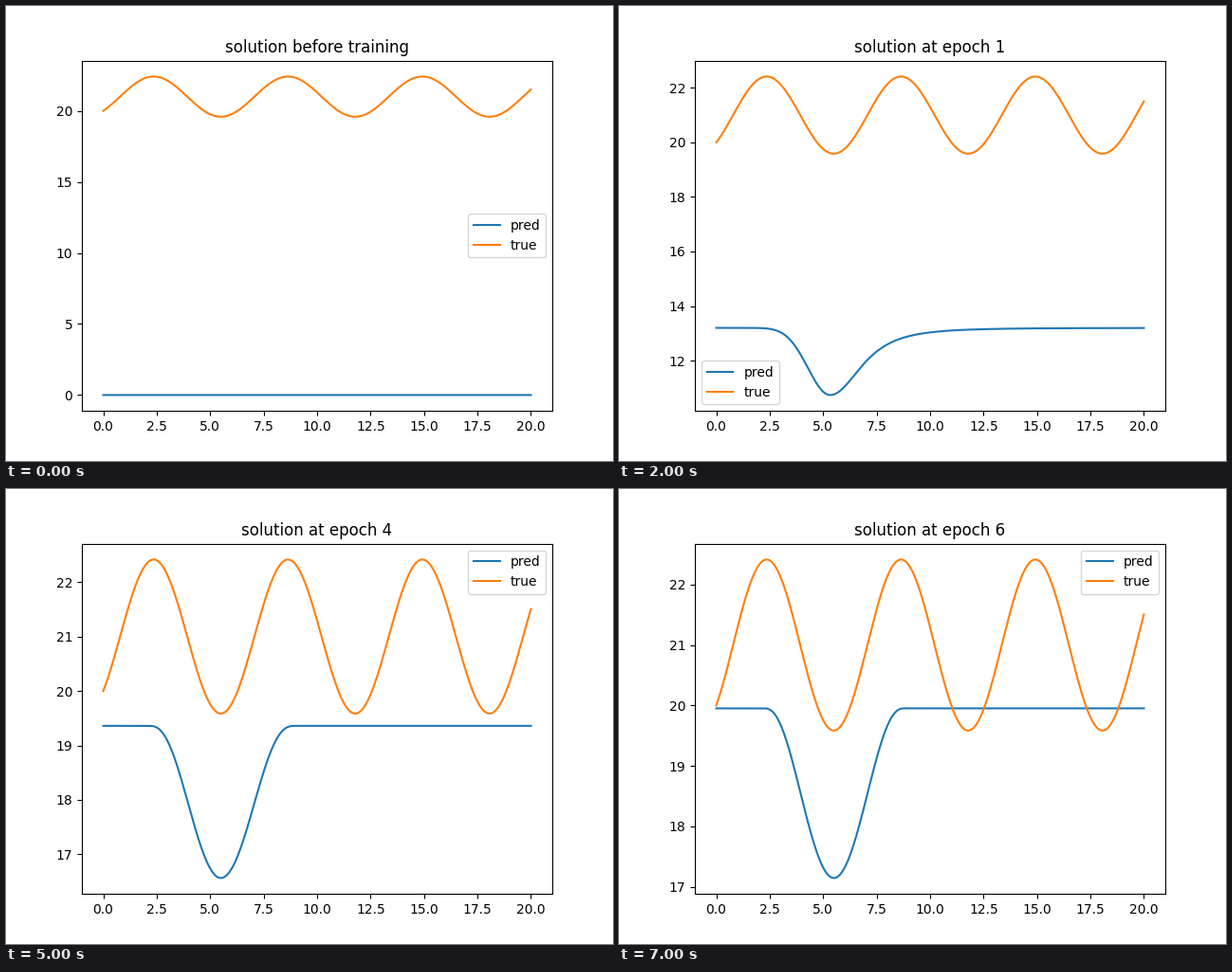
These frames come from a looping animation (640 px wide and 480 px high, 8 s). A matplotlib script:

```python
import numpy as np
import matplotlib.pyplot as plt
from matplotlib.animation import FuncAnimation

T = np.linspace(0, 20, 2001)
TRUE = 21 + np.sin(T) - np.cos(T)

# Resting level of the prediction at each epoch
LEVELS = [8.18, 13.2, 16.28, 18.30, 19.36, 19.775, 19.953]

# Key shapes of the dip: epoch, depth, centre, then (rate, tail) left and right
KEYS = np.array([
    (0, 2.26, 5.25, 0.55, -0.05, 0.32, 1.0),
    (2, 2.665, 5.4, 0.395, -0.05, 0.29, 0.19),
    (3, 2.833, 5.5, 0.265, -0.3, 0.252, -0.22),
    (4, 2.795, 5.5, 0.257, -0.34, 0.247, -0.33),
    (6, 2.806, 5.5, 0.252, -0.37, 0.246, -0.37),
]).T


def bell(x, rate, tail):
    """Bell curve: heavy tails for tail > 0, finite width for tail < 0."""
    return np.maximum(1 + tail * rate * x * x, 1e-9) ** (-1 / tail)


def predict(epoch):
    depth, centre, *sides = (np.interp(epoch, KEYS[0], key) for key in KEYS[1:])
    x = T - centre
    dip = np.where(x < 0, bell(x, *sides[:2]), bell(x, *sides[2:]))
    return LEVELS[epoch] - depth * dip


fig, ax = plt.subplots(figsize=(6.4, 4.8), dpi=100)


def draw(frame):
    ax.clear()
    if frame == 0:
        pred = np.full_like(T, 0.002)  # untrained output, just above zero
        title, loc = "solution before training", "center right"
    else:
        epoch = frame - 1
        pred = predict(epoch)
        title = f"solution at epoch {epoch}"
        loc = "lower left" if epoch < 3 else "upper right"
    ax.plot(T, pred, label="pred")
    ax.plot(T, TRUE, label="true")
    ax.set_title(title)
    ax.legend(loc=loc)
    return ax.lines


anim = FuncAnimation(fig, draw, frames=len(LEVELS) + 1, init_func=lambda: [],
                     interval=1000, repeat=True, repeat_delay=0)
plt.show()
```
